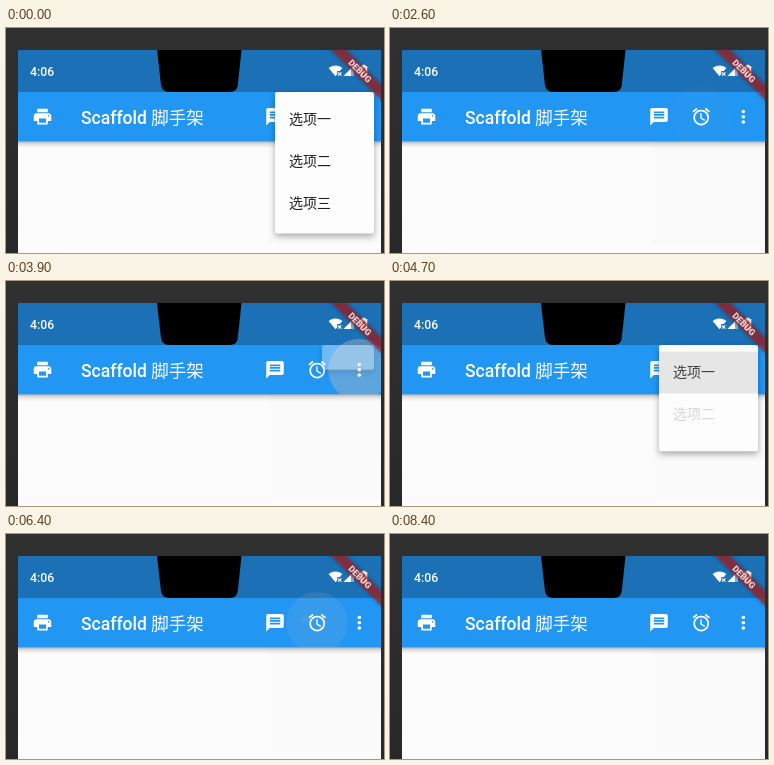
An HTML page that plays this animation: 378 by 225 pixels, repeating every 8.7 s.

```html
<!DOCTYPE html>
<html lang="zh">
<head>
<meta charset="utf-8">
<style>
  html, body { margin: 0; width: 100%; height: 100%; overflow: hidden; background: #2d2d2d; }
  svg { display: block; width: 100vw; height: 100vh; }
  text { font-family: Roboto, "Noto Sans CJK SC", "Noto Sans CJK", sans-serif; }
  .icon { fill: #fff; }
  #panel { filter: drop-shadow(0 3px 3px rgba(0, 0, 0, .32)); }
  #items text { font-size: 14px; fill: #212121; }
</style>
</head>
<body>
<svg viewBox="0 0 378 225">
  <defs>
    <linearGradient id="bezel" x2="0" y2="1">
      <stop offset="0" stop-color="#303030"/>
      <stop offset="1" stop-color="#282828"/>
    </linearGradient>
    <linearGradient id="shade" x2="0" y2="1">
      <stop offset="0" stop-color="#000" stop-opacity=".32"/>
      <stop offset=".4" stop-color="#000" stop-opacity=".12"/>
      <stop offset="1" stop-color="#000" stop-opacity="0"/>
    </linearGradient>
    <clipPath id="screen"><rect x="12" y="22" width="363" height="203"/></clipPath>
    <clipPath id="bar"><rect x="12" y="22" width="363" height="91.4"/></clipPath>
    <clipPath id="menuClip"><rect id="menuBox" y="64" rx="2"/></clipPath>
  </defs>

  <rect width="378" height="225" fill="url(#bezel)"/>
  <g clip-path="url(#screen)">
    <rect x="12" y="22" width="363" height="203" fill="#fcfcfc"/>
    <rect x="262" y="100" width="120" height="118" rx="6" fill="#fafafa"/>
    <rect x="12" y="113" width="363" height="7" fill="url(#shade)"/>
    <rect x="12" y="22" width="363" height="91.3" fill="#2196f3"/>
    <rect x="12" y="22" width="363" height="42" fill="#1b70b6"/>

    <g id="ripple" clip-path="url(#bar)">
      <circle id="glow" cy="88.7" r="30.8" fill="#bcbcbc"/>
      <circle id="splash" fill="#c8c8c8"/>
    </g>

    <text x="24" y="47.7" font-size="12.25" font-weight="500" fill="#fff">4:06</text>
    <text x="75" y="95.5" font-size="17.5" font-weight="500" fill="#fff">Scaffold <tspan font-weight="400">脚手架</tspan></text>
    <g id="icons"></g>

    <g class="icon">
      <path d="M329.5 48.3 L322.6 39.9 Q329.5 35 336.4 39.9 L333.8 43 H331.2 V46.2 Z"/>
      <path d="M332 44.3l3.4 3.4m0-3.4l-3.4 3.4" stroke="#fff" stroke-width="1.1"/>
      <path d="M348 37.5V48H337.5z" opacity=".45"/>
      <path d="M345 40.5V48H337.5z"/>
      <path d="M356.2 36.8h3.2v1.3h1.9v10.9h-7V38.1h1.9z"/>
      <path d="M358.5 39.5l-2.7 4.6h1.6v3.4l2.6-4.6h-1.5z" fill="#16324a"/>
    </g>

    <g id="menu">
      <rect id="panel" y="64" rx="2"/>
      <g clip-path="url(#menuClip)">
        <rect id="press" x="269" width="99" height="42" fill="#000"/>
        <g id="items">
          <text x="283" y="96">选项一</text>
          <text x="283" y="138.2">选项二</text>
          <text x="283" y="180.4">选项三</text>
        </g>
      </g>
    </g>

    <g transform="translate(375 22) rotate(45)">
      <rect x="-40" y="24.5" width="80" height="10.5" fill="#b71c1c" fill-opacity=".63"
            style="filter: drop-shadow(0 0 2px rgba(0, 0, 0, .5))"/>
      <text y="32.9" font-size="8.9" font-weight="900" text-anchor="middle" fill="#fff" fill-opacity=".8">DEBUG</text>
    </g>
  </g>
  <path d="M151 22H235.5L231.8 57Q231 64 224 64H163Q156 64 155 57Z" fill="#000"/>
</svg>

<script>
const LOOP = 8700, STEP = 100, OPEN_MS = 300;
const MENU = { right: 368, w: 99, h: 141.5 };
const UNIT = 1 / 4.5;

const ICONS = [
  [36.5, "M19 8H5c-1.66 0-3 1.34-3 3v6h4v4h12v-4h4v-6c0-1.66-1.34-3-3-3zm-3 11H8v-5h8v5zm3-7c-.55 0-1-.45-1-1s.45-1 1-1 1 .45 1 1-.45 1-1 1zm-1-9H6v4h12V3z"],
  [269, "M20 2H4c-1.1 0-2 .9-2 2v18l4-4h14c1.1 0 2-.9 2-2V4c0-1.1-.9-2-2-2zm-2 12H6v-2h12v2zm0-3H6V9h12v2zm0-3H6V6h12v2z"],
  [311.2, "M22 5.72l-4.6-3.86-1.29 1.53 4.6 3.86L22 5.72zM7.88 3.39L6.6 1.86 2 5.71l1.29 1.53 4.59-3.85zM12.5 8H11v6l4.75 2.85.75-1.23-4-2.37V8zM12 4c-4.97 0-9 4.03-9 9s4.02 9 9 9 9-4.03 9-9-4.03-9-9-9zm0 16c-3.87 0-7-3.13-7-7s3.13-7 7-7 7 3.13 7 7-3.13 7-7 7z"],
  [353.3, "M12 8c1.1 0 2-.9 2-2s-.9-2-2-2-2 .9-2 2 .9 2 2 2zm0 2c-1.1 0-2 .9-2 2s.9 2 2 2 2-.9 2-2-.9-2-2-2zm0 6c-1.1 0-2 .9-2 2s.9 2 2 2 2-.9 2-2-.9-2-2-2z"]
];

// Button taps: centre, start, end, splash shown
const TAPS = [
  [269, 1525, 2000, true],
  [311, 2590, 3100, true],
  [353, 3690, 4200, false],
  [353, 5110, 5500, false],
  [311, 6350, 6700, true],
  [353, 7210, 7600, false]
];

// Menu visits: opening, closing, pressed item, fill
const VISITS = [
  [-500, 600, -1, "#fdfdfd"],
  [3865, 4500, 0, "#fdfdfd"],
  [5190, 5800, 1, "#f8f8f8"],
  [7267, 8100, 2, "#fdfdfd"]
];

const $ = id => document.getElementById(id);
const clamp = v => Math.max(0, Math.min(1, v));
const set = (el, attrs) => { for (const k in attrs) el.setAttribute(k, attrs[k]); };
const labels = [...$("items").children];

$("icons").innerHTML = ICONS.map(([x, d]) =>
  `<path class="icon" transform="translate(${x - 10.5} 78.2) scale(.875)" d="${d}"/>`).join("");

function drawRipple(t) {
  const tap = TAPS.find(([, start, end]) => t > start && t < end);
  $("ripple").style.display = tap ? "" : "none";
  if (!tap) return;
  const [x, start, end, splash] = tap;
  const level = Math.min(clamp((t - start) / 150), clamp((end - t) / 200));
  const grow = clamp((t - start) / 400);
  set($("glow"), { cx: x, opacity: .4 * level });
  set($("splash"), {
    cx: x - 13 * (1 - grow), cy: 88.7 - 4 * (1 - grow),
    r: 30.8 * grow, opacity: splash ? .25 * level : 0
  });
}

function drawMenu(t) {
  const visit = VISITS.find(([open, close]) => t > open && t < close + OPEN_MS);
  $("menu").style.display = visit ? "" : "none";
  if (!visit) return;
  const [open, close, item, fill] = visit;
  const u = t < close
    ? clamp((t - open) / OPEN_MS)
    : clamp((1 - (t - close) / OPEN_MS) * 1.5);
  const width = MENU.w * clamp(u / UNIT);
  const box = { x: MENU.right - width, width, height: MENU.h * clamp(u / (3 * UNIT)) };
  set($("menu"), { opacity: clamp(u * 3) });
  set($("panel"), { ...box, fill });
  set($("menuBox"), box);
  labels.forEach((el, i) => {
    const from = (i + 1) * UNIT, to = Math.min(1, from + 1.5 * UNIT);
    set(el, { opacity: clamp((u - from) / (to - from)) });
  });
  const pressed = item >= 0 && t >= close ? clamp((t - close + 80) / 160) : 0;
  set($("press"), { y: 70.5 + 42 * Math.max(item, 0), opacity: .09 * pressed });
}

function render(ms) {
  const t = Math.floor((ms % LOOP) / STEP) * STEP;
  drawRipple(t);
  drawMenu(t);
}

const begin = performance.now();
function tick() {
  render(performance.now() - begin);
  requestAnimationFrame(tick);
}
tick();
</script>
</body>
</html>
```
